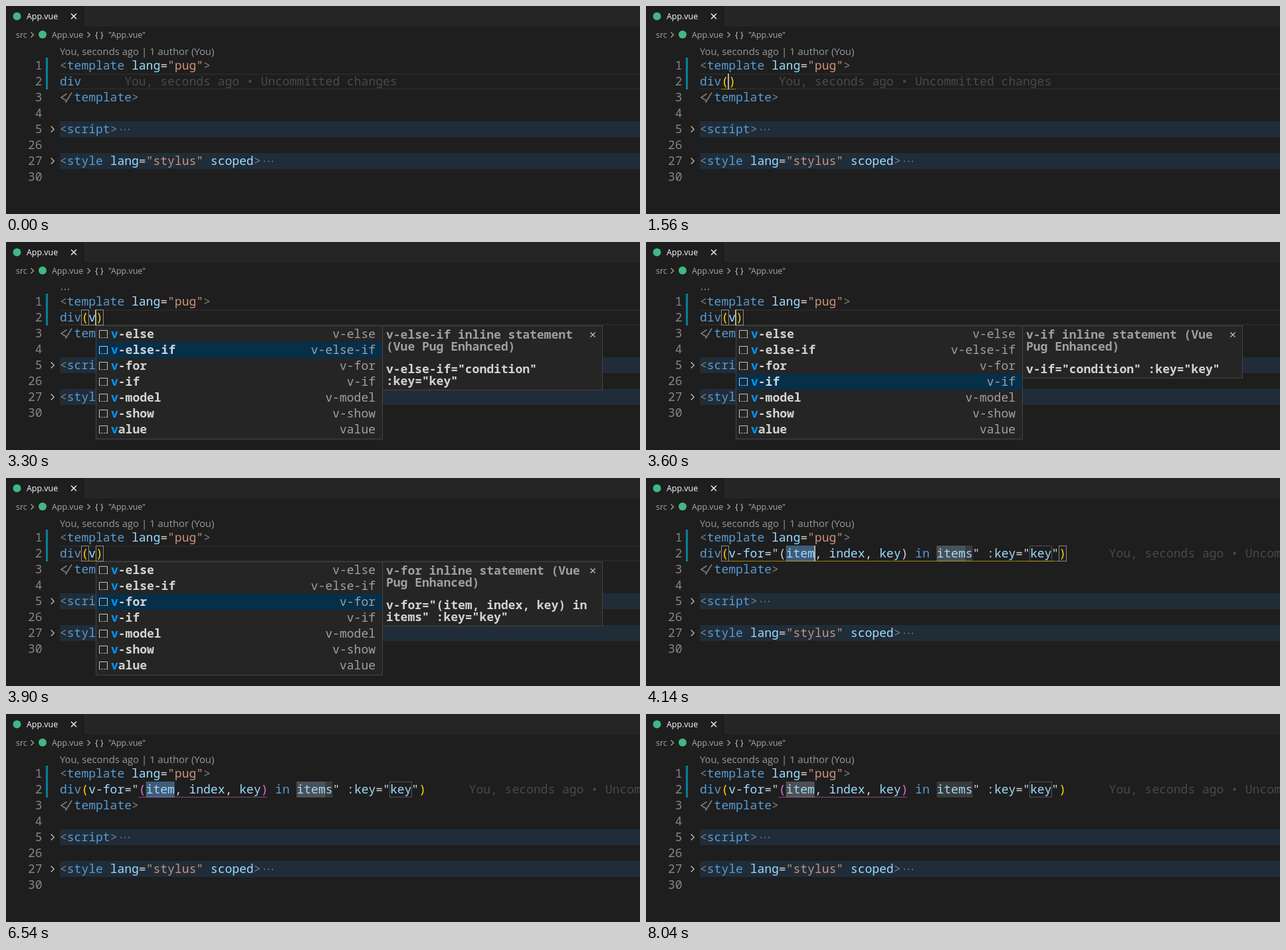
These frames come from a looping animation (954x314 px, 8100 ms). An HTML page:

```html
<!DOCTYPE html>
<html lang="en">
<head>
<meta charset="utf-8">
<title>Editor completion</title>
<style>
html, body { margin: 0; width: 100%; height: 100%; overflow: hidden; background: #1e1e1e; }
svg { display: block; width: 954px; height: 314px; }
text { white-space: pre; }
.code { font: 500 18px "Noto Sans Mono", "DejaVu Sans Mono", monospace; font-variant-ligatures: none; }
.menu { font-weight: 600; }
.ui { font: 12.4px "Open Sans", "Noto Sans", sans-serif; }
.lens { font: 14.85px "Open Sans", "Noto Sans", sans-serif; }
</style>
</head>
<body>
<svg id="stage" viewBox="0 0 954 314" xmlns="http://www.w3.org/2000/svg"></svg>
<script>
const LOOP = 8100, CW = 10.8, LEFT = 81;
const C = {
  tag: '#569cd6', punct: '#808080', attr: '#9cdcfe', plain: '#d4d4d4', str: '#ce9178',
  gold: '#ffd700', pink: '#da70d6', note: '#494949', dim: '#a0a0a0', line: '#454545'
};
const BLINK = [[660, 1200], [1560, 2040], [2280, 2760], [3240, 3780], [4140, 4620],
  [5100, 5580], [6060, 6540], [7020, 7500], [7980, 8040]];
const PICKS = [[2280, 0], [3300, 1], [3420, 2], [3600, 3], [3720, 2]];
const ITEMS = ['v-else', 'v-else-if', 'v-for', 'v-if', 'v-model', 'v-show', 'value'];
const DOCS = [
  ['v-else inline statement (Vu', 'e Pug Enhanced)', 'v-else="condition" :key="key"'],
  ['v-else-if inline statement', '(Vue Pug Enhanced)', 'v-else-if="condition"', ':key="key"'],
  ['v-for inline statement (Vue', 'Pug Enhanced)', 'v-for="(item, index, key) in', 'items" :key="key"'],
  ['v-if inline statement (Vue', 'Pug Enhanced)', 'v-if="condition" :key="key"']
];

const esc = s => s.replace(/&/g, '&amp;').replace(/</g, '&lt;').replace(/>/g, '&gt;');
const col = n => LEFT + n * CW;
const base = row => 96 + 24 * row;
const rect = (x, y, w, h, fill, more = '') =>
  `<rect x="${x}" y="${y}" width="${w}" height="${h}" fill="${fill}" ${more}/>`;
const frame = (x, y, w, h, stroke, fill = 'none') =>
  rect(x + .5, y + .5, w - 1, h - 1, fill, `stroke="${stroke}"`);
const path = (d, stroke, w = 1) => `<path d="${d}" fill="none" stroke="${stroke}" stroke-width="${w}"/>`;
const dot = (x, y, r, fill) => `<circle cx="${x}" cy="${y}" r="${r}" fill="${fill}"/>`;
const dots = (x, y, gap, r, fill) => [0, 1, 2].map(i => dot(x + i * gap, y, r, fill)).join('');
const text = (cls, x, y, parts, anchor = 'start') =>
  `<text class="${cls}" x="${x}" y="${y}" text-anchor="${anchor}">` +
  parts.map(([s, fill]) => `<tspan fill="${fill}">${esc(s)}</tspan>`).join('') + '</text>';
const code = (row, n, parts) => text('code', col(n), base(row), parts);
const chevron = (x, y, s, stroke) =>
  path(`M${x - s / 2} ${y - s}l${s} ${s}l${-s} ${s}`, stroke, 1.2);
const cross = (x, y, s, stroke) =>
  path(`M${x - s} ${y - s}l${2 * s} ${2 * s}M${x + s} ${y - s}l${-2 * s} ${2 * s}`, stroke, 1.2);
const attr = (name, val) => [[name, C.attr], ['=', C.plain], [`"${val}"`, C.str]];

function header() {
  return rect(0, 0, 954, 314, '#1e1e1e') + rect(118, 0, 836, 31, '#252526') +
    dot(16.5, 15.5, 6, '#41b883') + text('ui', 31, 20, [['App.vue', '#fff']]) + cross(102, 15.5, 4, '#fff') +
    text('ui', 15, 48, [['src', '#a9a9a9']]) + chevron(39.5, 43.5, 4, '#a9a9a9') +
    dot(55, 43, 6, '#41b883') + text('ui', 69, 48, [['App.vue', '#a9a9a9']]) +
    chevron(124.5, 43.5, 4, '#a9a9a9') + text('ui', 134, 47.5, [['{ }', '#ccc']]) +
    text('ui', 154, 48, [['"App.vue"', '#a9a9a9']]);
}

function body() {
  const nums = [1, 2, 3, 4, 5, 26, 27, 30].map((n, i) =>
    text('code', 54.6, base(i), [[String(n), '#858585']], 'end')).join('');
  const folds = [174, 222].map(y =>
    rect(LEFT, y, 873, 24, '#202d39') + chevron(70, y + 12, 4.5, '#c5c5c5')).join('');
  return nums + rect(60, 78, 3, 48, '#0c7d9d') + folds +
    code(0, 0, [['<', C.punct], ['template ', C.tag], ...attr('lang', 'pug'), ['>', C.punct]]) +
    path('M91.5 132.5L83 138L91.5 143.5M99 130.5L89.5 146', C.punct, 1.5) +
    code(2, 2, [['template', C.tag], ['>', C.punct]]) +
    code(4, 0, [['<', C.punct], ['script', C.tag], ['>', C.punct]]) + dots(173, 186.5, 6, 1, C.punct) +
    code(6, 0, [['<', C.punct], ['style ', C.tag], ...attr('lang', 'stylus'),
      [' scoped', C.attr], ['>', C.punct]]) + dots(389, 234.5, 6, 1, C.punct);
}

function lens(t) {
  const folded = (t >= 2040 && t < 3900) || (t >= 4620 && t < 5760);
  return folded ? dots(84, 71.5, 5, 1, '#999')
    : text('lens', LEFT, 74, [['You, seconds ago | 1 author (You)', '#999']]);
}

const note = n => code(1, n, [['You, seconds ago • Uncommitted changes', C.note]]);
const scope = (a, b, color) =>
  rect(Math.floor(col(a)), 125, Math.round((b - a) * CW), 1, color, 'opacity=".55"');
const bracket = n => frame(Math.floor(col(n)), 102, 12, 24, '#888');

function typedLine(t) {
  let s = rect(LEFT, 102, 873, 2, '#282828') + rect(LEFT, 124, 873, 2, '#282828');
  const inner = t < 2280 ? '' : 'v', open = t >= 1560, end = open ? 5 + inner.length : 3;
  if (open) s += scope(3, end, C.gold);
  if (t >= 1620) s += bracket(3) + bracket(end - 1);
  s += code(1, 0, open ? [['div', C.tag], ['(', C.gold], [inner, C.attr], [')', C.gold]] : [['div', C.tag]]);
  return s + (t < 1620 ? note(end + 6) : '');
}

function snippetLine(t) {
  const fresh = t < 4200, away = t >= 8040;
  const paren = fresh ? C.plain : C.pink;
  return rect(col(12), 102, 4 * CW, 24, away ? '#4e5053' : '#405c79') +
    rect(col(33), 102, 5 * CW, 24, '#3a3a3a') +
    (away ? '' : rect(col(33), 102, 4 * CW, 24, '#4b5158')) +
    frame(577, 102, 34, 24, '#525252') +
    (fresh ? scope(3, 51, C.gold) + bracket(3) + bracket(50) : scope(11, 29, C.pink)) +
    code(1, 0, [['div', C.tag], ['(', C.gold], ['v-for', C.attr], ['="', C.plain], ['(', paren],
      ['item', C.attr], [', ', C.plain], ['index', C.attr], [', ', C.plain], ['key', C.attr],
      [')', paren], [' in ', C.tag], ['items', C.attr], ['" ', C.plain], [':key', C.attr],
      ['="', C.plain], ['key', C.attr], ['"', C.plain], [')', C.gold]]) +
    (fresh || t >= 5760 ? note(57) : '');
}

function popup(t) {
  const pick = PICKS.filter(p => p[0] <= t).pop()[1];
  const docPick = t >= 3720 && t < 3780 ? 2 : pick;
  let s = frame(135, 126, 432, 172, C.line, '#252526') + rect(136, 127 + 24 * pick, 430, 24, '#062f4a');
  ITEMS.forEach((name, i) => {
    const y = 127 + 24 * i;
    s += path(`M140.5 ${y + 18}V${y + 6.5}H152.5V${y + 18}`, '#c5c5c5') +
      `<path d="M140 ${y + 17.5}H153" stroke="#c5c5c5" stroke-dasharray="2 1.5"/>` +
      text('code menu', 158, y + 18, [[name[0], '#0097fb'], [name.slice(1), C.plain]]) +
      text('code', 556, y + 18, [[name, C.dim]], 'end');
  });
  const doc = DOCS[docPick];
  s += frame(566, 126, 332, doc.length > 3 ? 98 : 80, C.line, '#252526') + cross(883, 140, 3.5, '#c5c5c5');
  doc.forEach((line, i) => {
    const y = i < 2 ? 146 + 18 * i : 162 + 18 * i;
    s += text('code menu', 572, y, [[line, i < 2 ? C.dim : C.plain]]);
  });
  return s;
}

function cursor(t) {
  if (!BLINK.some(([a, b]) => t >= a && t < b)) return '';
  const x = t < 1560 ? 112 : t < 2280 ? 123 : t < 4140 ? 134 : 253;
  return rect(x, 102, 2, 24, '#aeafad');
}

const stage = document.getElementById('stage');
const fixed = header() + body();
let shown = '';
function draw(t) {
  const next = lens(t) + (t < 4140 ? typedLine(t) : snippetLine(t)) +
    (t >= 2280 && t < 4140 ? popup(t) : '') + cursor(t);
  if (next !== shown) stage.innerHTML = fixed + (shown = next);
}

const start = performance.now();
function tick() {
  draw((performance.now() - start) % LOOP);
  requestAnimationFrame(tick);
}
tick();
</script>
</body>
</html>
```
